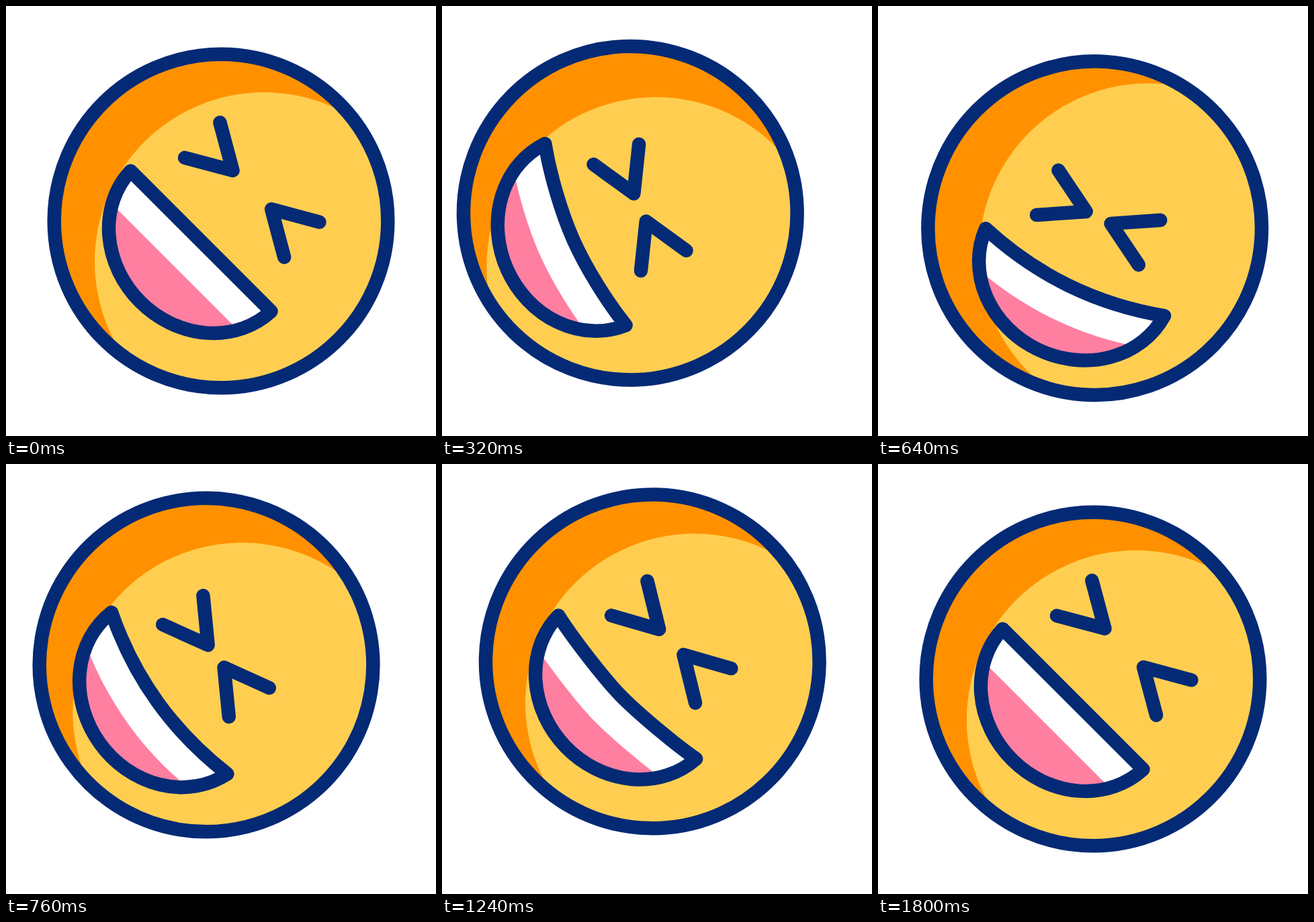
These frames come from a looping animation (640 by 640 pixels, 2 s). An HTML page:

```html
<!DOCTYPE html>
<html lang="en">
<head>
<meta charset="utf-8">
<title>Laughing face</title>
<style>
  html, body { margin: 0; width: 100%; height: 100%; overflow: hidden; background: #fff; }
  svg { display: block; width: 100vw; height: 100vh; }
  .line { fill: none; stroke: #042a75; stroke-width: 20.5; stroke-linecap: round; stroke-linejoin: round; }
</style>
</head>
<body>
<svg viewBox="0 0 640 640">
  <defs>
    <clipPath id="faceClip"><circle r="248.3"/></clipPath>
    <clipPath id="mouthClip"><path id="mouthArea"/></clipPath>
  </defs>
  <g id="face">
    <circle r="248.3" fill="#ff9100"/>
    <g clip-path="url(#faceClip)"><circle cx="88" cy="-2.5" r="252" fill="#ffce51"/></g>
    <circle class="line" r="248.3"/>
    <g id="mouth">
      <path id="teeth" fill="#fff"/>
      <g clip-path="url(#mouthClip)"><path id="tongue" fill="#ff7fa1"/></g>
      <path id="lips" class="line"/>
    </g>
    <path id="leftEye" class="line" d="M-64-37L0 0L-64 37"/>
    <path id="rightEye" class="line" d="M64-37L0 0L64 37"/>
  </g>
</svg>
<script>
const LOOP = 2000, STEP = 40;
const HALF = 147.9;      // half width of the mouth
const SAG = 22;          // depth of the upper lip when bowed
const TEETH = 54.5;

// Keys are [time, ...values], eased in and out between neighbours.
const swing = [
  // time, x, y, angle
  [0, 320, 320, 45],
  [320, 280.3, 308.2, 66],
  [560, 332.3, 343, 15],
  [800, 295.3, 295.5, 57.5],
  [1070, 326, 316.5, 39],
  [1310, 310, 288, 48],
  [1580, 320, 320, 45]
];
const lower = [[0, 0], [340, 1], [400, 1], [1800, 0]];
const squeeze = [[0, 0], [400, 1], [960, 1], [1760, 0]];

const $ = id => document.getElementById(id);
const ease = u => u * u * (3 - 2 * u);

function sample(keys, t) {
  const next = keys.findIndex(key => key[0] > t);
  if (next < 0) return keys[keys.length - 1].slice(1);
  const a = keys[next - 1], b = keys[next];
  const u = ease((t - a[0]) / (b[0] - a[0]));
  return a.slice(1).map((v, i) => v + (b[i + 1] - v) * u);
}

function place(id, x, y, angle = 0) {
  $(id).setAttribute("transform", `translate(${x} ${y}) rotate(${angle})`);
}

// Upper lip from left to right; flat at 0, fully bowed at 1.
function lipCurve(bow, y) {
  const handle = HALF / 3 * bow;
  const mid = y + SAG * bow;
  const side = y + SAG * bow * bow * 2 / 3;
  const outer = HALF - handle;
  return `M${-HALF} ${y}C${-outer} ${side} ${-handle} ${mid} 0 ${mid}` +
    `C${handle} ${mid} ${outer} ${side} ${HALF} ${y}`;
}

function draw(t) {
  const [x, y, angle] = sample(swing, t);
  const [low] = sample(lower, t);
  const [pinch] = sample(squeeze, t);
  const drop = 31.9 * low;

  place("face", x, y, angle);
  place("mouth", 2.2 * pinch, 42.4 + drop);

  const eyeX = 40.7 - 20.2 * pinch;
  const eyeY = -65.5 + drop + 19.5 * pinch;
  place("leftEye", -eyeX - 2 * pinch, eyeY);
  place("rightEye", eyeX - 2 * pinch, eyeY);

  const outline = lipCurve(pinch, 0) + `A148 132.5 0 0 1 ${-HALF} 0Z`;
  for (const id of ["mouthArea", "teeth", "lips"]) $(id).setAttribute("d", outline);
  $("tongue").setAttribute("d", lipCurve(pinch, TEETH) + `V200H${-HALF}Z`);
}

const start = performance.now();
function tick() {
  const t = (performance.now() - start) % LOOP;
  draw(Math.floor(t / STEP) * STEP);
  requestAnimationFrame(tick);
}
tick();
</script>
</body>
</html>
```
